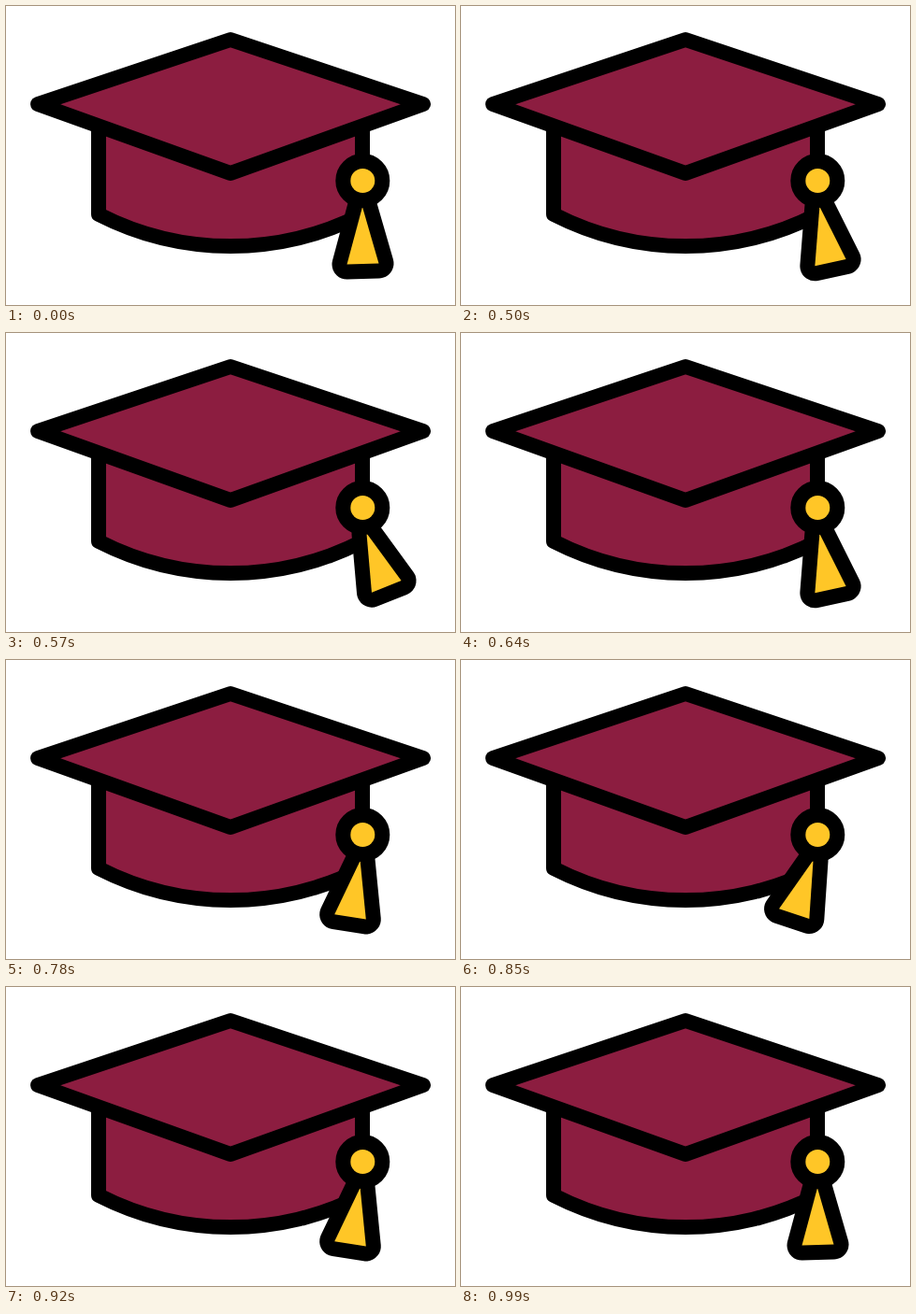
Animation, 480 px wide and 320 px high, one loop 1060 ms. Source, as an HTML page:

```html
<!DOCTYPE html>
<html lang="en">
<head>
<meta charset="utf-8">
<title>Graduation cap</title>
<style>
  html, body { margin: 0; height: 100%; overflow: hidden; background: #fff; }
  svg { display: block; width: 480px; height: 320px; }
  .cap { fill: #8c1d40; stroke: #000; stroke-width: 16; stroke-linejoin: round; }
  .gold { fill: #ffc627; stroke: #000; stroke-linejoin: round; paint-order: stroke; }
</style>
</head>
<body>
<svg viewBox="0 0 480 320">
  <path class="cap" d="M99 125V223A309 309 0 0 0 381 223V125"/>
  <path class="cap" d="M34 105L240 36L446 105L240 179Z"/>
  <path id="tassel" class="gold" stroke-width="32" d="M381 215L398.5 275.5L364.5 276.5Z"/>
  <circle class="gold" stroke-width="32" cx="381.3" cy="187" r="13"/>
</svg>
<script>
  const LOOP = 1060, REST = 500, STEP = 70;
  const SWING = [-10.5, -20, -10.5, 0, 10.5, 20, 10.5, 0];
  const tassel = document.getElementById('tassel');

  function draw() {
    const t = performance.now() % LOOP;
    const angle = t < REST ? 0 : SWING[Math.floor((t - REST) / STEP)];
    tassel.setAttribute('transform', `rotate(${angle} 381 202)`);
    requestAnimationFrame(draw);
  }
  draw();
</script>
</body>
</html>
```
